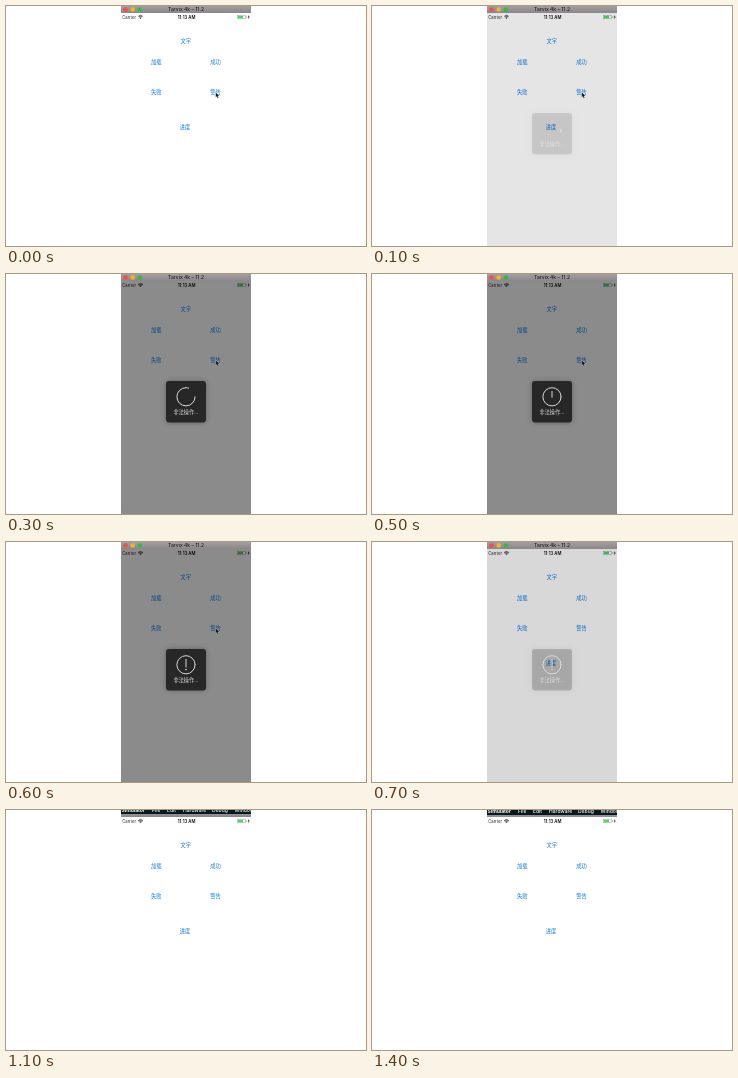
An HTML page with a canvas for the animation above (1500 ms loop, 360 by 240 pixels).

```html
<!DOCTYPE html>
<html lang="zh">
<head>
<meta charset="utf-8">
<style>
html, body { margin: 0; width: 100%; height: 100%; overflow: hidden; background: #fff; }
canvas { display: block; width: 360px; height: 240px; }
</style>
</head>
<body>
<canvas id="stage" width="360" height="240"></canvas>
<script>
const ctx = document.getElementById('stage').getContext('2d');
const LOOP = 1500, STEP = 100;
const LATIN = 'Inter, "Liberation Sans", sans-serif';
const CJK = '"Noto Sans CJK SC", "Noto Sans CJK", sans-serif';
const TAU = Math.PI * 2;

const ramp = (t, from, to) => Math.min(1, Math.max(0, (t - from) / (to - from)));
const smooth = x => x * x * (3 - 2 * x);

function rect(x, y, w, h, color) {
  ctx.fillStyle = color;
  ctx.fillRect(x, y, w, h);
}

function disc(x, y, r, color) {
  ctx.fillStyle = color;
  ctx.beginPath();
  ctx.arc(x, y, r, 0, TAU);
  ctx.fill();
}

function line(x1, y1, x2, y2) {
  ctx.beginPath();
  ctx.moveTo(x1, y1);
  ctx.lineTo(x2, y2);
  ctx.stroke();
}

function polygon(points, color) {
  ctx.fillStyle = color;
  ctx.beginPath();
  points.forEach(([x, y]) => ctx.lineTo(x, y));
  ctx.closePath();
  ctx.fill();
}

function label(text, x, y, size, color, { family = LATIN, weight = 400, align = 'center' } = {}) {
  ctx.font = `${weight} ${size}px ${family}`;
  ctx.textAlign = align;
  ctx.textBaseline = 'alphabetic';
  ctx.fillStyle = color;
  ctx.fillText(text, x, y);
}

function drawTitleBar() {
  const shade = ctx.createLinearGradient(0, 0, 0, 7);
  shade.addColorStop(0, '#a39fa1');
  shade.addColorStop(1, '#8b8789');
  rect(115, 0, 130, 7, shade);
  disc(119.5, 3.5, 2.3, '#f34f4a');
  disc(126.7, 3.5, 2.3, '#f5b32c');
  disc(133.9, 3.5, 2.3, '#35b944');
  label('Tarvix 4k – 11.2', 180, 5.2, 5, '#222', { weight: 500 });
}

function drawStatusBar() {
  label('Carrier', 116.3, 12.6, 4.2, '#222', { align: 'left' });
  ctx.strokeStyle = '#222';
  ctx.lineWidth = 0.7;
  for (const r of [1.2, 2.2, 3.2]) {
    ctx.beginPath();
    ctx.arc(134.5, 12.6, r, -Math.PI * 0.75, -Math.PI * 0.25);
    ctx.stroke();
  }
  disc(134.5, 12.3, 0.5, '#222');
  label('11:13 AM', 180.5, 12.6, 4.3, '#111', { weight: 600 });
  ctx.strokeStyle = '#999';
  ctx.lineWidth = 0.5;
  ctx.strokeRect(231.5, 9.2, 8.2, 3.6);
  rect(232, 9.7, 5, 2.6, '#4bd964');
  rect(240.1, 10.2, 0.6, 1.6, '#999');
  polygon([[243, 9], [241.6, 11.3], [242.6, 11.3], [242.2, 13.2], [243.8, 10.7], [242.8, 10.7]], '#222');
}

function drawButtons() {
  const buttons = [
    ['文字', 179.7, 35.1], ['加载', 150.2, 56.1], ['成功', 209.5, 56.1],
    ['失败', 150.2, 86.1], ['警告', 209.5, 86.1], ['进度', 179, 121]
  ];
  for (const [text, x, y] of buttons) label(text, x, y + 2, 5.3, '#0a7cea', { family: CJK, weight: 500 });
}

function drawHud(t, presence) {
  const ink = '#d8d8d8';
  rect(115, 7, 130, 233, `rgba(0,0,0,${0.455 * presence})`);

  ctx.save();
  ctx.globalAlpha = presence ** 1.4;
  ctx.shadowColor = 'rgba(0,0,0,.3)';
  ctx.shadowBlur = 5;
  ctx.fillStyle = '#272727';
  ctx.beginPath();
  ctx.roundRect(160, 107, 40, 41.5, 3);
  ctx.fill();
  ctx.restore();

  // The strokes stay bright while the panel fades around them.
  ctx.globalAlpha = Math.sqrt(presence);
  ctx.strokeStyle = presence < 1 ? '#fff' : ink;
  ctx.lineWidth = 1;
  ctx.lineCap = 'round';
  ctx.beginPath();
  ctx.arc(180, 122.8, 9.1, 0, TAU * ramp(t, 85, 355));
  ctx.stroke();

  const stem = ramp(t, 400, 530);
  if (stem > 0) line(180, 117.4, 180, 117.4 + 7.6 * stem);
  if (t >= 550) disc(180, 127.6, 0.8, ctx.strokeStyle);
  label('非法操作...', 180, 139.8, 5.2, ctx.strokeStyle, { family: CJK });
  ctx.globalAlpha = 1;
}

function drawCursor(x, y) {
  const arrow = [[0, 0], [0, 5], [1.1, 4.1], [2, 6], [3, 5.5], [2.1, 3.7], [3.6, 3.6]];
  const points = arrow.map(([dx, dy]) => [x + dx, y + dy]);
  polygon(points, '#111');
  ctx.strokeStyle = 'rgba(255,255,255,.6)';
  ctx.lineWidth = 0.4;
  ctx.stroke();
}

function drawMenu(progress) {
  ctx.save();
  ctx.beginPath();
  ctx.rect(115, 0, 130, 7);
  ctx.clip();
  ctx.translate(0, -6 * (1 - progress));
  rect(115, -2, 130, 7, '#07191d');
  rect(115, 5, 130, 2 * progress, '#929092');
  label('Simulator', 115.5, 3.4, 5, '#fff', { align: 'left', weight: 700 });
  const items = [['File', 146], ['Edit', 161], ['Hardware', 177], ['Debug', 206], ['Window', 228.5]];
  for (const [text, x] of items) label(text, x, 3.4, 5, '#fff', { align: 'left', weight: 500 });
  ctx.restore();
}

function draw(t) {
  rect(0, 0, 360, 240, '#fff');
  drawTitleBar();
  drawStatusBar();
  drawButtons();

  const presence = ramp(t, 50, 270) * (1 - ramp(t, 620, 740));
  if (presence > 0) drawHud(t, presence);
  if (t < 700) drawCursor(209.7, 86.3);

  const menu = smooth(ramp(t, 800, 1200));
  if (menu > 0) drawMenu(menu);
}

const start = performance.now();
function tick() {
  const t = (performance.now() - start) % LOOP;
  draw(Math.floor(t / STEP) * STEP);
  requestAnimationFrame(tick);
}
tick();
</script>
</body>
</html>
```
